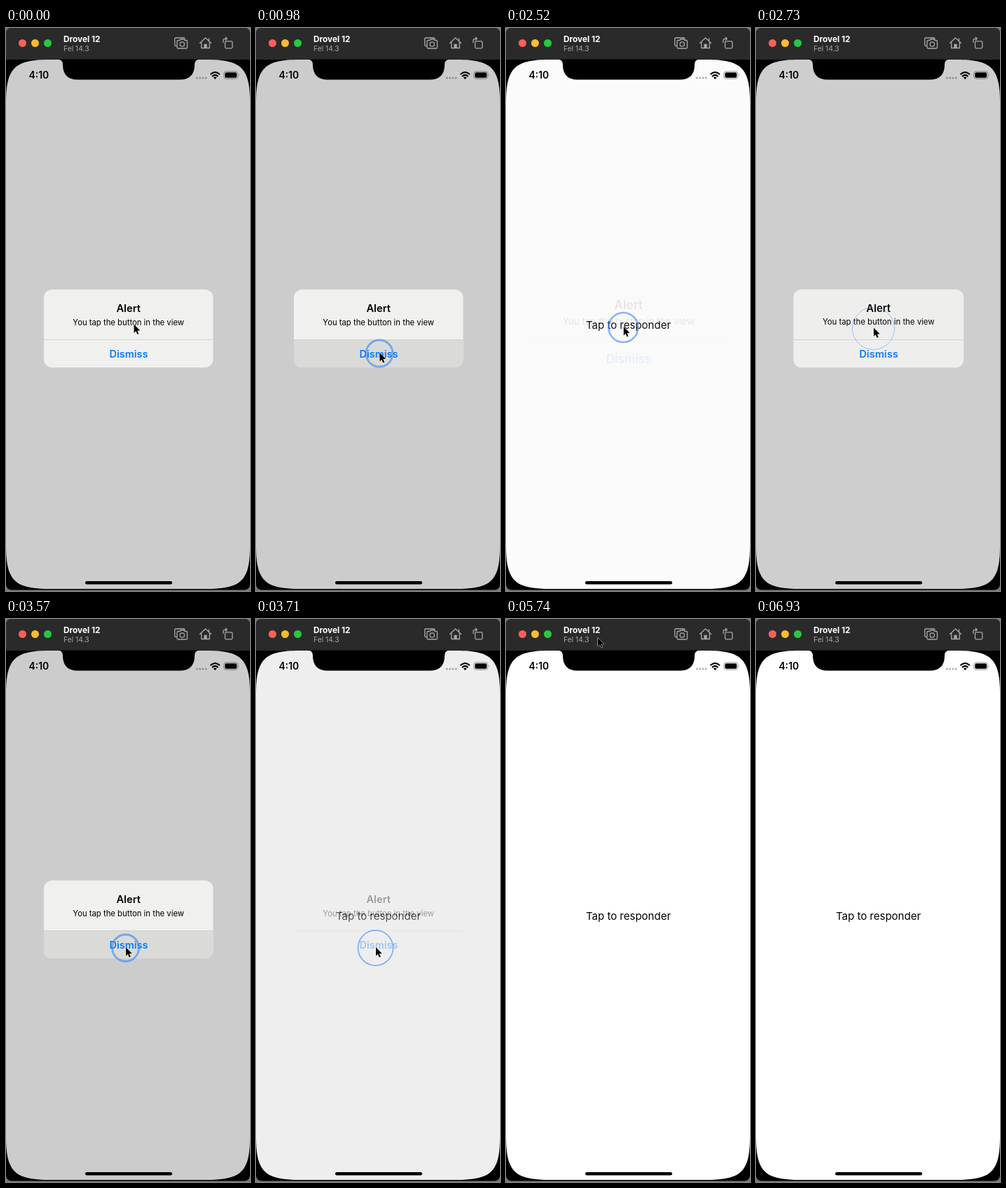
An HTML page that plays this animation: 348 by 801 pixels, repeating every 7.07 s.

```html
<!DOCTYPE html>
<html lang="en">
<head>
<meta charset="utf-8">
<title>Alert demo</title>
<style>
  html, body { margin: 0; width: 100%; height: 100%; overflow: hidden; background: #777; }
  svg { display: block; width: 100vw; height: 100vh; font-family: Inter, Roboto, sans-serif; }
  .mid { text-anchor: middle; }
  .semi { font-weight: 600; }
</style>
</head>
<body>
<svg viewBox="0 0 348 801">
  <defs>
    <clipPath id="screen">
      <path d="M0 107C0 57 12 45 62 45H286C336 45 348 57 348 107V736C348 786 336 798 286 798H62C12 798 0 786 0 736Z"/>
    </clipPath>
    <clipPath id="card"><rect x="54" y="372" width="241.5" height="111" rx="12"/></clipPath>
  </defs>

  <!-- Window -->
  <rect width="348" height="799.5" rx="8"/>
  <path d="M0 45V8Q0 0 8 0H340Q348 0 348 8V45Z" fill="#2a2a2a"/>
  <circle cx="23.5" cy="21.5" r="5.5" fill="#ff5f57"/>
  <circle cx="41.5" cy="21.5" r="5.5" fill="#febc2e"/>
  <circle cx="59.5" cy="21.5" r="5.5" fill="#28c840"/>
  <text x="82" y="20" font-size="11.8" font-weight="700" fill="#fff">Drovel 12</text>
  <text x="82" y="32.5" font-size="10.3" fill="#a4a4a4">Fel 14.3</text>
  <g fill="none" stroke="#a8a8a8" stroke-width="1.3" stroke-linejoin="round" stroke-linecap="round">
    <path d="M243 25.5H242Q240.7 25.5 240.7 24V15.5Q240.7 14 242.2 14H253.5Q255 14 255 15.5"/>
    <path d="M245.5 17.5H248L249.2 16H253.8L255 17.5H257Q258.5 17.5 258.5 19V27.5Q258.5 29 257 29H245.5Q244 29 244 27.5V19Q244 17.5 245.5 17.5Z"/>
    <circle cx="251.3" cy="23" r="3.2"/>
    <path d="M276.5 21.5L284.5 14L292.5 21.5M278.7 20V28.5H290.3V20M289.5 18V15"/>
    <path d="M283 28V23.5H286V28Z" fill="#a8a8a8"/>
    <rect x="312.5" y="18.8" width="10.3" height="10" rx="1.5"/>
    <path d="M309.8 20.5V18Q309.8 15.3 312.5 15.3H315M313.2 13.2L315.3 15.3L313.2 17.4"/>
  </g>

  <g clip-path="url(#screen)">
    <rect y="45" width="348" height="754" fill="#fff"/>
    <text class="semi" x="32.5" y="72" font-size="13.9">4:10</text>
    <g fill="#b4b4b4">
      <circle cx="272.3" cy="71" r="1.5"/><circle cx="276.6" cy="71" r="1.5"/>
      <circle cx="280.9" cy="71" r="1.5"/><circle cx="285.2" cy="71" r="1.5"/>
    </g>
    <g fill="none" stroke="#000" stroke-width="2.1">
      <path d="M291.5 66.1Q298.2 59.5 304.9 66.1M294 68.9Q298.2 64.9 302.4 68.9"/>
    </g>
    <path d="M295.8 70.4Q298.2 68.5 300.6 70.4L298.2 73Z"/>
    <rect x="310.8" y="61.8" width="19.8" height="10.4" rx="3" fill="none" stroke="#9a9a9a"/>
    <rect x="312.3" y="63.3" width="16.8" height="7.4" rx="1.8"/>
    <path d="M331.8 65.2Q333.6 67 331.8 68.8Z" fill="#9a9a9a"/>

    <text class="mid" x="174.5" y="427.5" font-size="15">Tap to responder</text>
    <rect id="dim" y="45" width="348" height="754"/>

    <g id="alert">
      <g clip-path="url(#card)">
        <rect x="54" y="372" width="242" height="111" fill="#f0f0ef"/>
        <rect id="pressed" x="54" y="443.5" width="242" height="40" fill="#dadbd9"/>
        <rect x="54" y="443" width="242" height=".8" fill="#cbcbca"/>
      </g>
      <text class="mid semi" x="174.7" y="404" font-size="14.7">Alert</text>
      <text class="mid" x="174.7" y="422.5" font-size="11.3">You tap the button in the view</text>
      <text class="mid semi" x="175" y="469" font-size="14.5" fill="#0a7aff">Dismiss</text>
    </g>
    <rect x="113" y="787" width="124" height="4.6" rx="2.3"/>
  </g>
  <path d="M74 44.5Q81 45 81 52C81 66 88 73.5 102 73.5H248C262 73.5 269 66 269 52Q269 45 276 44.5Z"/>

  <circle id="ring" fill="none" stroke="#3c87f5" stroke-opacity=".62"/>
  <path id="cursor" d="M0 0V12.4L2.8 9.8L4.7 14.3L6.8 13.4L4.9 9H8.8Z" stroke="#fff" stroke-width=".9" paint-order="stroke"/>
</svg>

<script>
const LOOP = 7070, STEP = 70, CURSOR_GONE = 6930;
const SPRING = 22.8 / 1000;
const PRESENT = 2500, DISMISSALS = [1090, 3610];
const PRESSES = [910, 2403, 3500];

// [time, x, y]; the pointer eases from one stop to the next
const PATH = [
  [0, 182.5, 421.5], [770, 176.5, 462], [1260, 176.5, 462], [1540, 170, 428],
  [1960, 170, 428], [2240, 167.8, 425], [2660, 167.8, 425], [3290, 171, 467],
  [3780, 171, 467], [4620, 291.5, 39], [4900, 291.5, 39], [5390, 190, 30],
  [5530, 190, 30], [5810, 120, 26], [6020, 120, 26], [6440, 37, 17]
];

const el = id => document.getElementById(id);
const [dim, alertBox, pressed, ring, cursor] =
  ["dim", "alert", "pressed", "ring", "cursor"].map(el);
const show = (node, on) => node.setAttribute("visibility", on ? "visible" : "hidden");
const set = (node, attrs) => {
  for (const name in attrs) node.setAttribute(name, attrs[name]);
};

// Critically damped spring from 0 to 1
function settle(ms) {
  const p = Math.max(0, ms) * SPRING;
  return 1 - (1 + p) * Math.exp(-p);
}

function pointerAt(t) {
  const next = PATH.findIndex(stop => stop[0] > t);
  if (next < 0) return PATH[PATH.length - 1].slice(1);
  const [t0, x0, y0] = PATH[next - 1], [t1, x1, y1] = PATH[next];
  const k = (t - t0) / (t1 - t0), e = k * k * (3 - 2 * k);
  return [x0 + (x1 - x0) * e, y0 + (y1 - y0) * e];
}

function draw(t) {
  const secondRun = t >= PRESENT;
  const entered = secondRun ? settle(t - PRESENT) : 1;
  const left = settle(t - DISMISSALS[secondRun ? 1 : 0]);
  const shown = entered * (1 - left);
  const scale = 1.2 - 0.2 * entered;
  set(dim, { opacity: 0.2 * shown });
  set(alertBox, {
    opacity: shown,
    transform: `translate(174.7 427.5) scale(${scale}) translate(-174.7 -427.5)`
  });
  show(pressed, t >= PRESSES[0] && t < DISMISSALS[0] || t >= PRESSES[2] && t < DISMISSALS[1]);

  const [x, y] = pointerAt(t);
  set(cursor, { transform: `translate(${x} ${y})` });
  show(cursor, t < CURSOR_GONE);

  const press = PRESSES.find(start => t >= start && t < start + 350);
  show(ring, press !== undefined);
  if (press !== undefined) {
    const age = t - press;
    set(ring, {
      cx: x - 0.5, cy: y + 1, r: 16 + 0.043 * age,
      "stroke-width": Math.max(0.6, 3.5 - 0.0085 * age)
    });
  }
}

function tick() {
  const t = performance.now() % LOOP;
  draw(Math.floor(t / STEP) * STEP);
  requestAnimationFrame(tick);
}
tick();
</script>
</body>
</html>
```
